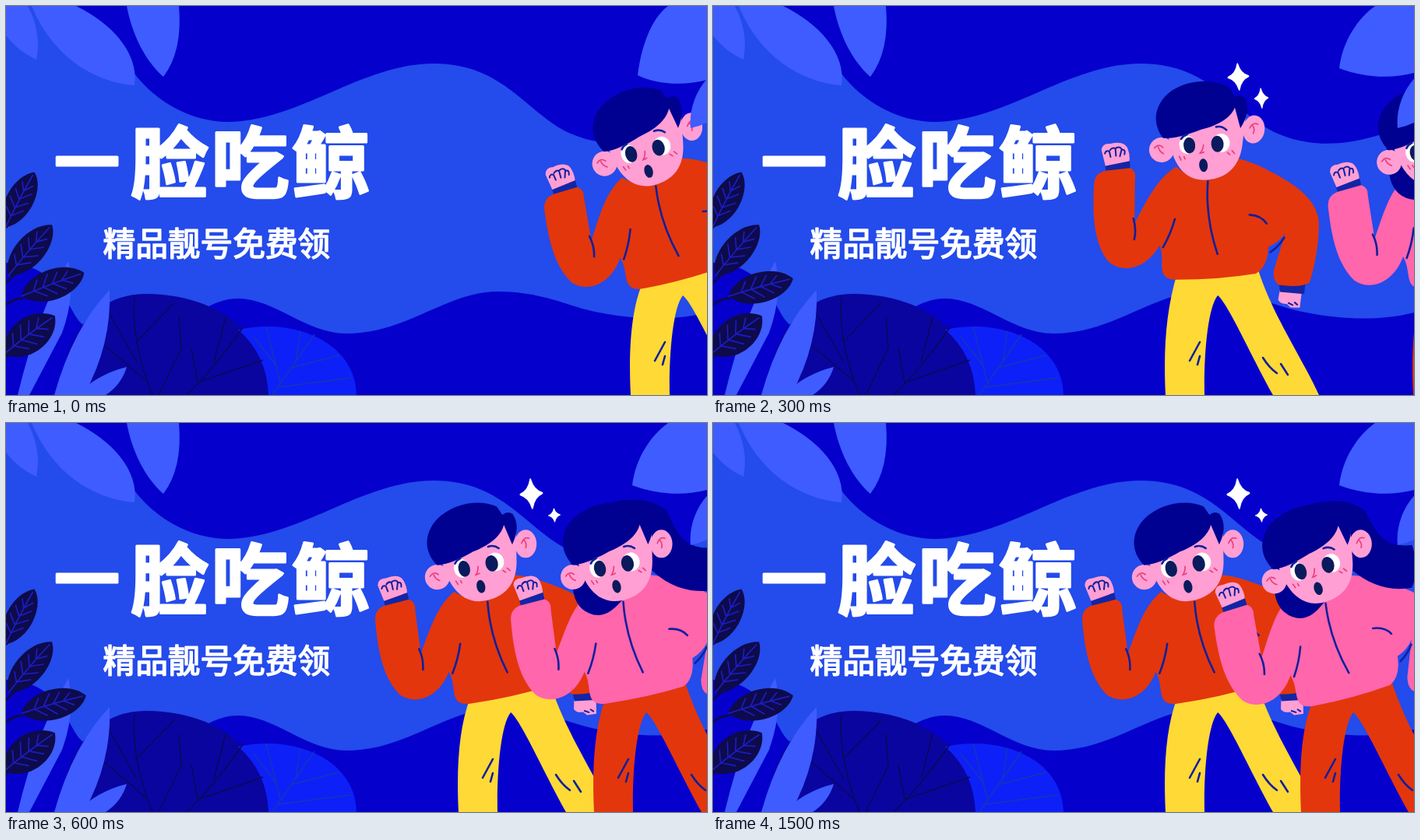
Recreate the animation shown at these times as an HTML page. Size 900 px wide and 500 px high, loop 1.6 s.

```html
<!DOCTYPE html>
<html lang="zh">
<head>
<meta charset="utf-8">
<style>
  html, body { margin: 0; width: 100%; height: 100%; overflow: hidden; background: #0600cd; }
  svg { display: block; width: 100vw; height: 100vh; }
  text { font-family: "Noto Sans CJK SC", "Noto Sans CJK", sans-serif; fill: #fff; stroke: #fff; stroke-linejoin: round; }
  .title { font-size: 100px; font-weight: 900; letter-spacing: 3.5px; stroke-width: 3; }
  .dash { font-size: 84px; }
  .sub { font-size: 41.7px; font-weight: 500; stroke-width: 1.7; }
  .line { fill: none; stroke: #101f9c; stroke-width: 2.6; stroke-linecap: round; stroke-linejoin: round; }
  .fine { stroke-width: 2; }
  .red { fill: none; stroke: #e8407c; stroke-width: 1.7; stroke-linecap: round; }
  .light { fill: #3e5cff; }
  .skin { fill: #ff9fd4; }
  .navy { fill: #000091; }
  .cuff { fill: #1325a5; }
  .ink { fill: #0b1a5c; }
</style>
</head>
<body>
<svg viewBox="0 0 900 500">
  <defs>
    <g id="head">
      <ellipse class="skin" cx="620" cy="179" rx="16" ry="16"/>
      <ellipse class="skin" cx="740" cy="162" rx="14" ry="18" transform="rotate(12 740 162)"/>
      <path class="red" d="M611 176q6-6 11 0M616 175q1 6 6 9M735 160q5-8 11-4M739 157q3 5 0 10"/>
      <path class="skin" d="M630 155C630 190 642 222 675 222C704 222 719 205 724 180L732 140L715 115L640 130Z"/>
      <path class="navy" d="M623 164C609 141 617 119 636 106C660 91 694 92 714 107L719 119Q727 115 732 121Q739 139 723 159L718 132C711 146 692 154 672 157C652 163 637 166 623 164Z"/>
      <ellipse cx="653" cy="175" rx="10" ry="12" fill="#fff"/>
      <ellipse cx="697" cy="176" rx="11" ry="12" fill="#fff"/>
      <ellipse class="ink" cx="656" cy="176" rx="7.5" ry="10.5"/>
      <ellipse class="ink" cx="692" cy="177" rx="8" ry="10.5"/>
      <ellipse class="ink" cx="672" cy="203" rx="5.5" ry="8.5"/>
      <path class="line" d="M646 167q3-4 8-5M692 155q8-1 13 5"/>
      <path class="red" d="M674 177q-1 6-5 10q3 0 5-1M642 189l2 5M648 190l1 3M704 189l3 3M710 187l3 4"/>
    </g>
    <g id="hands">
      <path class="skin" d="M547 197L543 173Q545 164 555 166Q574 163 577 175Q580 186 576 196Z"/>
      <path class="line fine" d="M547 178q2-5 6-2l1 7M554 174q4-4 7-1l0 9M562 172q5-2 7 2l-3 9M570 175q4 0 2 6"/>
      <path class="cuff" d="M546 194L578 190L578 202L547 204Z"/>
      <path class="skin" d="M757 371L754 383Q757 389 765 389L769 394L781 395L785 375Z"/>
      <path class="line fine" d="M767 388l5 3M775 388l3 3"/>
      <path class="cuff" d="M757 358L791 362L788 378L757 373Z"/>
    </g>
    <path id="top" d="M546 200Q532 202 530 216C524 260 525 292 540 316C556 334 588 331 608 301C612 315 607 327 609 336Q611 346 627 347Q680 351 728 347Q744 340 747 314Q762 309 770 298L752 343Q748 359 757 364Q783 370 796 364C804 345 813 312 814 286C813 255 783 233 748 212C728 200 712 196 702 194C690 222 660 226 637 202C611 215 595 244 578 270L583 214Q586 204 578 199Z"/>
    <path id="seams" class="line" d="M676 224Q669 270 681 318M577 264Q580 278 576 291M630 269Q623 288 612 304M726 271Q741 273 747 284M768 304Q761 314 749 321"/>
    <path id="knees" class="line" d="M656 432L643 456M656 450L653 461M737 452Q745 465 755 472M760 460L769 474"/>
    <g id="frond">
      <path d="M-1 .1C-.7-1.2 .5-1.5 1-.1C.7 1.2-.5 1.5-1 .1Z" fill="#0d0b4c"/>
      <path d="M-1 .1Q0-.1 .9-.1M-.6 0l.2-.65M-.3-.05l.25-.75M0-.08l.25-.65M.3-.1l.25-.45M-.6 0l.35.65M-.3-.05l.35.75M0-.08l.35.65M.3-.1l.3.45" fill="none" stroke="#1c1cc0" stroke-width="1.7" vector-effect="non-scaling-stroke"/>
    </g>
    <path id="spark" d="M0-1Q.22-.22 1 0Q.22.22 0 1Q-.22.22-1 0Q-.22-.22 0-1Z" fill="#fff" stroke="#fff" stroke-width=".14" stroke-linejoin="round"/>
  </defs>

  <rect width="900" height="500" fill="#0600cd"/>
  <path fill="#244beb" d="M0 0H70L165 87C190 120 235 149 285 149C380 147 455 74 550 74C640 74 670 140 725 164C785 190 850 172 900 148V394C850 407 790 402 740 389C705 378 675 367 632 367C565 367 515 421 437 421C385 421 345 376 298 376C270 376 255 392 225 400L100 410C80 400 75 332 0 330Z"/>
  <g class="light">
    <path d="M0 0H28Q46 34 39 69Q15 58 0 38Z"/>
    <path d="M33 0H90C135 22 171 60 165 102C110 98 58 62 33 0Z"/>
    <path d="M155 0H222Q227 58 202 91C180 72 162 38 155 0Z"/>
  </g>
  <path fill="#0a059f" d="M70 500C72 430 110 370 180 370C272 371 336 420 337 500Z"/>
  <path fill="#0e20f8" d="M298 416C370 400 449 432 450 500H337Q335 448 298 416Z"/>
  <g fill="none" stroke-width="1.4">
    <path stroke="#0a0a52" d="M165 374Q160 430 188 500M128 387L168 458M216 382L167 432M108 420L180 482M305 412Q264 470 232 500M238 440L246 484M330 455L246 484M282 400L267 457M196 500L225 440L222 400"/>
    <path stroke="#1238b4" d="M396 422L342 500M334 412L352 483M378 418L372 457M428 449L366 465M443 478L349 490M318 425L348 464"/>
  </g>
  <g class="light">
    <path d="M80 328Q90 370 72 420L30 500H15Q40 395 80 328Z"/>
    <path d="M133 365Q136 435 100 500H62Q86 414 133 365Z"/>
    <path d="M155 464Q148 487 128 500H90Q118 473 155 464Z"/>
  </g>
  <path d="M0 285L5 275M0 356L16 341M0 384Q12 375 22 376M0 452L5 442" fill="none" stroke="#0d0b4c" stroke-width="3"/>
  <use href="#frond" transform="translate(18 249) rotate(-60) scale(40 17)"/>
  <use href="#frond" transform="translate(31 314) rotate(-47) scale(43 18)"/>
  <use href="#frond" transform="translate(30 423) rotate(-34) scale(41 22)"/>
  <g id="sprig"><use href="#frond" transform="translate(60 358) rotate(-18) scale(43 19)"/></g>

  <text class="title dash" x="62" y="232">一</text>
  <text class="title" x="160" y="239">脸吃鲸</text>
  <text class="sub" x="124.5" y="321">精品靓号免费领</text>

  <g id="boy">
    <path class="legs" fill="#ffd935"/>
    <use class="shift" href="#knees"/>
    <g class="lean">
      <use href="#hands"/><use href="#top" fill="#e3360d"/><use href="#seams"/><use href="#head"/>
    </g>
  </g>
  <g id="girl">
    <path class="legs" fill="#e3360d"/>
    <use class="shift" href="#knees"/>
    <g class="lean">
      <use href="#hands"/><use href="#top" fill="#ff66ab"/><use href="#seams"/>
      <path class="navy" d="M624 135Q640 97 694 96Q736 97 756 122C762 150 765 176 803 181Q804 214 788 234C758 231 736 215 721 193L664 229Q645 240 630 229Q611 215 618 185Z"/>
      <use href="#head"/>
    </g>
  </g>
  <use id="bigStar" href="#spark"/>
  <use id="smallStar" href="#spark"/>
  <path id="cornerLeaf" class="light"/>
  <path id="sideLeaf" class="light" d="M915 80C889 98 876 130 879 157Q905 152 930 130Z"/>
</svg>
<script>
const $ = id => document.getElementById(id);
const STEP = 100, LOOP = 1600;
const HIP_X = 679;
const WAIST = { x: 689, y: 348 };

// One entry per step: hip position and backward lean in degrees.
const boySteps = [[869, 15], [770, 7], [679, 0], [648, 4.5], [648, 9.5], [648, 12.6]];
const girlSteps = [null, null, null, [966, 14], [919, 12], [871, 11], [822, 12.5], [822, 14.4], [822, 15.4]];
// Half width and half height of both stars over an 800 ms cycle.
const starSteps = [[12, 14, 9, 11], [12, 14, 9, 11], [12, 15, 9, 11.5], [13, 16.5, 8.5, 12.5], [14, 18.5, 7.5, 8.5], [14, 18.5, 7.5, 8.5], [14, 18.5, 7.5, 8.5], [14, 18.5, 7.5, 8.5]];
const swaySteps = [0, 1, 2, 1];
const sprigAngle = [0, 5, 8], leafTip = [[811, 89], [804, 80], [802, 68]], sideShift = [0, 0, 9];

function swing(x, y, degrees) {
  const a = degrees * Math.PI / 180, c = Math.cos(a), s = Math.sin(a);
  x -= WAIST.x; y -= WAIST.y;
  return `${WAIST.x + x * c + y * s} ${WAIST.y - x * s + y * c}`;
}

function pose(id, steps, index) {
  const person = $(id), state = steps[Math.min(index, steps.length - 1)];
  person.style.display = state ? '' : 'none';
  if (!state) return;
  const [x, angle] = state, move = `translate(${x - HIP_X} 0)`;
  const legs = person.querySelector('.legs');
  legs.setAttribute('d', `M${swing(627, 340, angle)}C613 390 609 440 612 500H662C661 450 666 388 679 372C692 382 722 450 750 500H809C785 448 748 395 ${swing(731, 340, angle)}Z`);
  legs.setAttribute('transform', move);
  person.querySelector('.shift').setAttribute('transform', move);
  person.querySelector('.lean').setAttribute('transform', `${move} rotate(${-angle} ${WAIST.x} ${WAIST.y})`);
}

function star(id, x, y, w, h, visible) {
  $(id).setAttribute('transform', `translate(${x} ${y}) rotate(-4) scale(${w} ${h})`);
  $(id).style.display = visible ? '' : 'none';
}

function draw(time) {
  const index = Math.floor(time % LOOP / STEP);
  pose('boy', boySteps, index);
  pose('girl', girlSteps, index);
  const [bw, bh, sw, sh] = starSteps[index % 8];
  star('bigStar', 674.5, 91, bw, bh, index >= 3);
  star('smallStar', 704, 118.5, sw, sh, index >= 3);
  const sway = swaySteps[Math.floor(index / 2) % 4];
  const [x, y] = leafTip[sway];
  $('sprig').setAttribute('transform', `rotate(${sprigAngle[sway]} 18 375)`);
  $('cornerLeaf').setAttribute('d', `M${x} ${y}C${x + 4} ${y - 35} 828 16 850 0H900V${y + 6}C870 ${y + 14} 835 ${y + 12} ${x} ${y}Z`);
  $('sideLeaf').setAttribute('transform', `translate(${sideShift[sway]} 0)`);
}

const start = performance.now();
function tick() {
  draw(performance.now() - start);
  requestAnimationFrame(tick);
}
tick();
</script>
</body>
</html>
```
